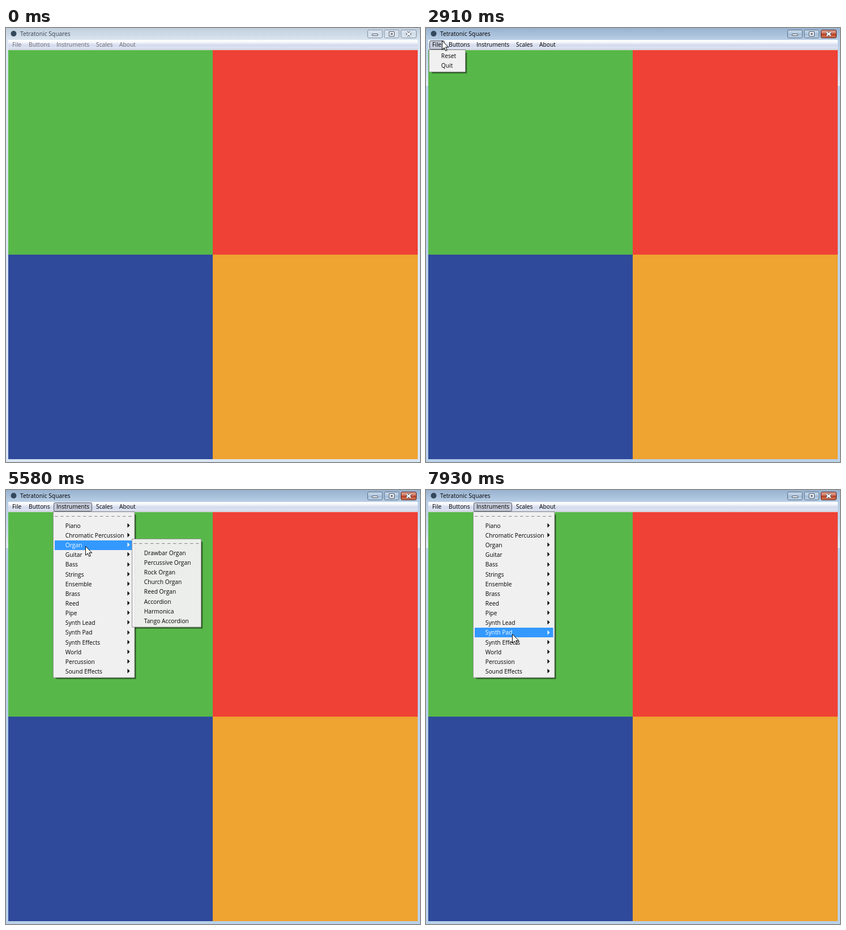
An HTML page for the animation above (8 s loop, 731 by 766 pixels).

```html
<!DOCTYPE html>
<html lang="en">
<head>
<meta charset="utf-8">
<title>Tetratonic Squares</title>
<style>
  html, body { margin: 0; width: 100%; height: 100%; overflow: hidden; background: #d9e5f3; }
  svg { display: block; width: 100%; height: 100%; }
  text { font-family: "Open Sans", "Noto Sans", sans-serif; font-size: 10.25px; white-space: pre; }
</style>
</head>
<body>
<svg id="stage" viewBox="0 0 731 766"></svg>
<script>
const LOOP = 8000, TICK = 80, ROW = 17.14;
const stage = document.getElementById("stage");

function el(parent, tag, attrs = {}, text) {
  const node = document.createElementNS("http://www.w3.org/2000/svg", tag);
  for (const name in attrs) node.setAttribute(name, attrs[name]);
  if (text !== undefined) node.textContent = text;
  parent.appendChild(node);
  return node;
}
const group = (parent = stage) => el(parent, "g");
const rect = (parent, x, y, width, height, fill, extra) =>
  el(parent, "rect", { x, y, width, height, fill, ...extra });
const label = (parent, x, y, text, fill = "#000") => el(parent, "text", { x, y, fill }, text);
const show = (node, alpha) => node.setAttribute("opacity", alpha);

const defs = el(stage, "defs");
function gradient(id, ...stops) {
  const g = el(defs, "linearGradient", { id, x2: 0, y2: 1 });
  stops.forEach(([offset, color]) => el(g, "stop", { offset, "stop-color": color }));
  return `url(#${id})`;
}

// Window frame, drawn once for each focus state
const bar = gradient("bar", [0, "#ffffff"], [0.25, "#f5f7fb"], [0.45, "#dbe1f0"], [0.6, "#d4dbed"], [1, "#e2e7f5"]);
const looks = {
  idle: {
    title: gradient("idleTitle", [0, "#c0cedc"], [1, "#dae5f1"]),
    side: "#dae5f3", frame: "#dae5f3", ink: "#6d6d72", titleInk: "#384250",
    button: gradient("idleButton", [0, "#dce6f0"], [0.5, "#d2deea"], [1, "#dee8f2"]),
    edge: "#8592a3"
  },
  active: {
    title: gradient("activeTitle", [0, "#98b2cf"], [1, "#b8cee6"]),
    side: gradient("activeSide", [0, "#b7cde5"], [0.6, "#c9daec"], [1, "#e2ebf5"]),
    frame: "#b9d1ea", ink: "#000", titleInk: "#000",
    button: gradient("activeButton", [0, "#c6d7e9"], [0.48, "#b4c9e0"], [0.5, "#a3bcd6"], [1, "#bfd3e8"]),
    edge: "#5d7187"
  }
};
looks.idle.close = looks.idle.button;
looks.active.close = gradient("activeClose", [0, "#dfa596"], [0.48, "#cd7660"], [0.5, "#b83f23"], [1, "#d1805f"]);

const tabs = { File: [11, 21], Buttons: [40, 42], Instruments: [89, 62], Scales: [159, 34], About: [200, 35] };

function drawFrame(look) {
  const g = group();
  rect(g, 0, 0, 731, 766, look.frame);
  rect(g, 0, 20, 731, 82, look.side);
  rect(g, 0, 0, 731, 21, look.title);
  label(g, 25, 14.3, "Tetratonic Squares", look.titleInk);
  el(g, "circle", { cx: 13.5, cy: 10, r: 5, fill: "#34495c" });
  [638, 667.5, 697].forEach((x, i) =>
    rect(g, x + 0.5, 3.5, i < 2 ? 26 : 27, 14, i < 2 ? look.button : look.close,
      { rx: 2.5, stroke: i === 2 && look === looks.active ? "#5a2119" : look.edge }));
  const mark = { fill: "#fff", stroke: "#465263" };
  el(g, "rect", { x: 646.5, y: 10.5, width: 10, height: 3, rx: 0.5, ...mark });
  el(g, "path", { d: "M676.5 6.5h9v8h-9zM679.5 9.5h3v2h-3z", "fill-rule": "evenodd", ...mark });
  const cross = "M707.5 7.5l7 6M714.5 7.5l-7 6";
  el(g, "path", { d: cross, stroke: "#465263", "stroke-width": 4.4 });
  el(g, "path", { d: cross, stroke: "#fff", "stroke-width": 2.4 });
  rect(g, 4, 21, 723, 17, bar);
  rect(g, 4, 37, 723, 1, "#b7bdcd");
  rect(g, 4, 38, 723, 1, "#f0f0f0");
  return { g, look };
}
function drawLabels({ g, look }) {
  for (const name in tabs) label(g, tabs[name][0], 33.3, name, look.ink);
}

drawLabels(drawFrame(looks.idle));
const active = drawFrame(looks.active);
const tabMarks = {};
for (const name of ["File", "Buttons", "Instruments"]) {
  const [x, width] = tabs[name];
  tabMarks[name] = rect(active.g, x - 4.5, 22.5, width + 5, 15, "#c5cad9", { rx: 2, stroke: "#565b69" });
}
drawLabels(active);

rect(stage, 4, 39, 361, 361, "#57b849");
rect(stage, 365, 39, 362, 361, "#ef4136");
rect(stage, 4, 400, 361, 361, "#2f4a9a");
rect(stage, 365, 400, 362, 361, "#efa330");

// Popup menus
function makeMenu({ x, y, width, items, tearoff = true, arrows = false, open, close, fade, tab }) {
  const g = group();
  const first = y + (tearoff ? 24.5 : 10.8);
  const height = first - y + (items.length - 1) * ROW + 11;
  rect(g, x + 5, y + 5, width - 2, height - 2, "#000", { opacity: 0.25, rx: 1 });
  rect(g, x + 5, y + 5, width - 3, height - 3, "#000", { opacity: 0.4 });
  rect(g, x, y, width, height, "#f0f0f0", { stroke: "#979797" });
  if (tearoff) el(g, "path", {
    d: `M${x + 2.5} ${y + 8}H${x + width - 2}`, stroke: "#858585", "stroke-dasharray": "5.5 4.5"
  });
  const rows = items.map((text, i) => {
    const mid = first + i * ROW;
    const back = rect(g, x + 2.5, Math.round(mid - 8.5), width - 5, 17, "#3399ff");
    const ink = group(g);
    el(ink, "text", { x: x + 21.3, y: Math.round(mid + 3.9) }, text);
    if (arrows) el(ink, "path", { d: `M${x + width - 12.5} ${Math.round(mid) - 4.5}l4 4-4 4z` });
    return { back, ink };
  });
  return { g, x, width, top: first - 8.5, rows, open, close, fade, tab };
}

const menus = [
  { x: 5.5, y: 38.5, width: 64, tearoff: false, items: ["Reset", "Quit"],
    open: 2440, close: 2990, fade: [0.3, 0.65, 1], tab: "File" },
  { x: 34.5, y: 38.5, width: 98, items: ["4 Buttons", "9 Buttons", "16 Buttons"],
    open: 2990, close: 4560, fade: [0.3, 0.65, 1], tab: "Buttons" },
  { x: 83.5, y: 38.5, width: 143.5, arrows: true,
    items: ["Piano", "Chromatic Percussion", "Organ", "Guitar", "Bass", "Strings", "Ensemble", "Brass",
      "Reed", "Pipe", "Synth Lead", "Synth Pad", "Synth Effects", "World", "Percussion", "Sound Effects"],
    open: 4560, close: LOOP, fade: [0.3, 0.6, 1], tab: "Instruments" },
  { x: 222.5, y: 86.5, width: 122,
    items: ["Drawbar Organ", "Percussive Organ", "Rock Organ", "Church Organ", "Reed Organ",
      "Accordion", "Harmonica", "Tango Accordion"],
    open: 5500, close: 6680, fade: [0.5, 0.97, 0.97, 0.97, 0.97, 0.97, 0.97, 0.97, 0.97, 1] },
  { x: 222.5, y: 171.5, width: 115,
    items: ["Trumpet", "Trombone", "Tuba", "Muted Trumpet", "French Horn", "Brass Section",
      "Synth Brass 1", "Synth Brass 2"],
    open: 6910, close: 7930, fade: [0.3, 0.65, 1] }
].map(makeMenu);

const pointer = group();
const arrow = "M.5.5V16.2L4.2 12.7 6.6 18.1 9 17 6.7 11.8H11.8Z";
el(pointer, "path", { d: arrow, transform: "translate(1.5 1.2)", opacity: 0.2 });
el(pointer, "path", { d: arrow, fill: "#fff", stroke: "#000", "stroke-width": 0.95 });

// Pointer moves: start, number of ticks, points along the way
const moves = [
  [140, 8, [670, 800], [525, 633], [420, 508], [250, 335], [222, 283]],
  [1090, 4, [222, 283], [310, 276], [470, 262], [554, 258]],
  [1640, 5, [554, 258], [320, 225], [210, 165], [146, 105]],
  [2040, 6, [146, 105], [60, 50], [20, 27]],
  [2910, 1, [20, 27], [28, 22]],
  [2990, 3, [28, 22], [46, 26]],
  [3390, 4, [46, 26], [56, 64]],
  [3780, 2, [56, 64], [58, 81]],
  [4240, 4, [58, 81], [66, 50], [80, 27]],
  [4560, 2, [80, 27], [106, 27], [112, 35]],
  [4710, 5, [112, 35], [135, 84]],
  [5110, 2, [135, 84], [140, 99]],
  [6200, 5, [140, 99], [146, 177]],
  [7530, 4, [146, 177], [152, 254]]
];

function pointerAt(t) {
  const move = moves.filter(m => m[0] <= t).pop();
  if (!move) return null;
  const [start, ticks, ...points] = move;
  const done = Math.min(1, (Math.floor((t - start) / TICK) + 1) / ticks);
  const place = done * (points.length - 1);
  const i = Math.min(Math.floor(place), points.length - 2);
  return points[i].map((v, axis) => Math.round(v + (points[i + 1][axis] - v) * (place - i)));
}

function levelAt(t, open, steps) {
  if (t < open) return 0;
  return steps[Math.min(Math.floor((t - open) / TICK), steps.length - 1)];
}

function render(t) {
  const at = pointerAt(t);
  show(pointer, at ? 1 : 0);
  if (at) pointer.setAttribute("transform", `translate(${at})`);
  show(active.g, levelAt(t, 700, [0.35, 0.7, 1]));

  for (const menu of menus) {
    const isOpen = t >= menu.open && t < menu.close;
    show(menu.g, isOpen ? levelAt(t, menu.open, menu.fade) : 0);
    if (menu.tab) show(tabMarks[menu.tab], isOpen ? 1 : 0);
    const inside = at && at[0] > menu.x && at[0] < menu.x + menu.width;
    const hot = inside ? Math.floor((at[1] - menu.top) / ROW) : -1;
    menu.rows.forEach(({ back, ink }, i) => {
      show(back, i === hot ? 1 : 0);
      ink.setAttribute("fill", i === hot ? "#fff" : "#000");
    });
  }
}

function loop() {
  render(performance.now() % LOOP);
  requestAnimationFrame(loop);
}
loop();
</script>
</body>
</html>
```
